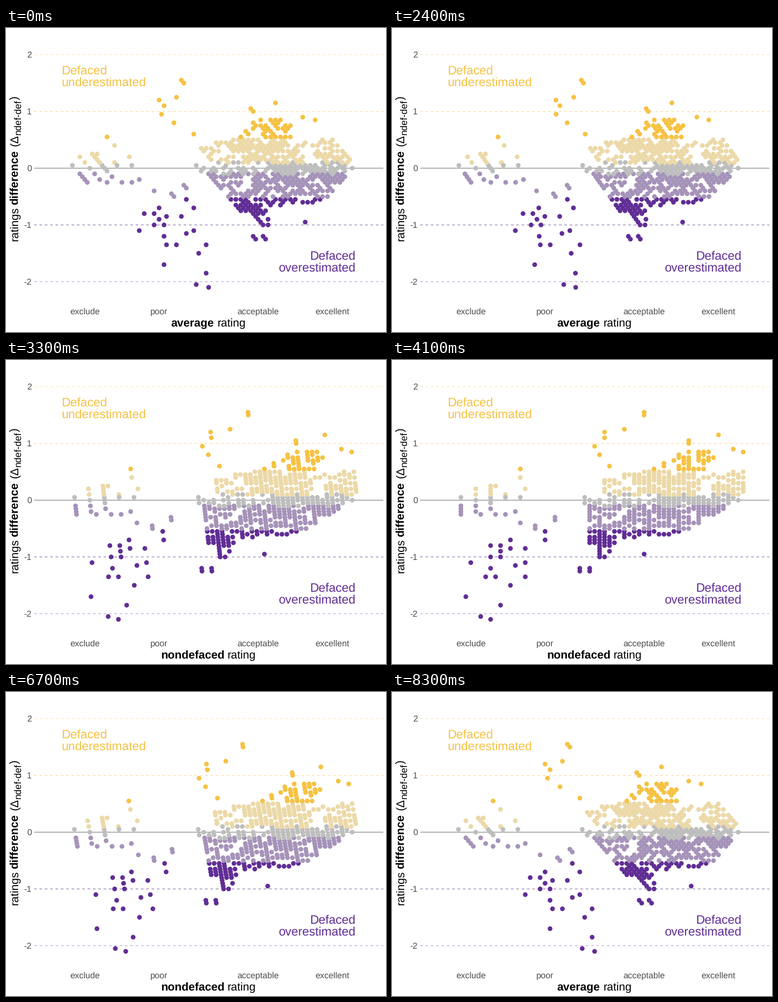
A matplotlib script that plays this animation: 837x669 px, repeating every 10 s.

```python
import numpy as np
import matplotlib.pyplot as plt
from matplotlib.animation import FuncAnimation

W, H, DPI = 837, 669, 64
PT = 72 / DPI
plt.rcParams.update({"font.family": "Liberation Sans", "text.hinting": "none",
                     "text.hinting_factor": 1})

GOLD, TAN, GREY = "#F6C244", "#ECD9A8", "#BEBEBE"
MAUVE, PURPLE = "#A693B9", "#612E95"
X0, Y0, DX, DY = 555.4, 308.5, 10.91, 6.245

# Ratings come in steps of 0.05: n counts the nondefaced rating from
# "acceptable", k counts the difference from zero.
RUNS = [  # n, first k, last k, step
    (0, 30, 31, 1), (-8, 22, 24, 2), (9, 20, 21, 1),
    (-37, -5, -2, 1), (-34, -4, 4, 2), (-31, -1, 5, 1),
    (-22, -10, -9, 1), (-18, -7, -6, 1), (-20, -14, -11, 3),
    (-29, -20, -16, 2), (-31, -24, -16, 4), (-24, -27, -17, 5),
    (-27, -17, -14, 3), (-13, -25, -24, 1), (-11, -25, -24, 1),
]
OUTLIERS = [
    (-4, 25), (15, 23), (-10, 19), (-9, 16), (-7, 12), (-25, 11), (18, 18),
    (20, 17), (-31, -42), (-33, -41), (-29, -37), (-36, -34), (-27, -30),
    (-30, -27), (-32, -27), (-26, -23), (-35, -22), (0, -19),
]


def density(n, k):
    """Chance that a dot sits at step n, k of the dense cloud."""
    if k > 10:
        inside = k - 9 >= 0 and n >= k - 9 and (n <= 12 or k > n)
        if not inside or k > 17 or n > 15:
            return 0
        return 0.62 if n >= 8 else 0.3
    if k < -10:
        floor = -13 - 8 * np.exp(-((n + 8.6) / 2.4) ** 2) + max(n - 1, 0) / 4
        if not (-11 <= n <= 8) or k < floor:
            return 0
        return 1 if n == -9 else 0.6
    if abs(k) < 2:
        if not -12 <= n <= 19:
            return 0
        return 0.85 if 3 <= n <= 13 else 0.5
    if k < 0:
        if not -11 <= n <= 19 + k:
            return 0
        return 0.85 if k >= -4 and n > 3 else 0.64
    if n < max(-8, 2 * k - 22) or n > 20:
        return 0
    if 11 <= n <= 16:
        return 0.6 if k < 7 else 0.12
    return 0.72 if n >= -2 else 0.5


def tint(k):
    if abs(k) < 2:
        return GREY
    if k > 0:
        return GOLD if k > 10 else TAN
    return PURPLE if k < -10 else MAUVE


def build_dots():
    rng = np.random.default_rng(12)
    dots = {}
    for k in range(-22, 18):
        for n in range(-12, 21):
            keep, mix = rng.random(2)
            if keep < density(n, k):
                dots[n, k] = GREY if abs(k) == 2 and mix < 0.35 else tint(k)
    # loose scatter around "exclude"
    for n, k in np.rint(rng.normal((-28, 0), (3.5, 4), (14, 2))).astype(int):
        dots[n, k] = tint(k)
    for n, first, last, step in RUNS:
        for k in range(first, last + 1, step):
            dots[n, k] = tint(k)
    for n, k in OUTLIERS:
        dots[n, k] = tint(k)
    return dots


dots = build_dots()
n, k = np.array(list(dots)).T
nondef_x = X0 + DX * n
mean_x = nondef_x - DX / 2 * k
dot_y = Y0 - DY * k

fig = plt.figure(figsize=(W / DPI, H / DPI), dpi=DPI, facecolor="white")
ax = fig.add_axes([0, 0, 1, 1])
ax.set_xlim(0, W)
ax.set_ylim(H, 0)
ax.axis("off")


def write(x, y, text, size, color="black", **kw):
    return ax.text(x, y, text, fontsize=size * PT, color=color,
                   va="baseline", **kw)


def rule(value, color, style=(0, (4.2, 4.2))):
    y = Y0 - 20 * DY * value
    ax.plot([62, 831], [y, y], color=color, lw=1.4 * PT, ls=style, snap=False,
            dash_capstyle="butt", solid_capstyle="butt", zorder=1)


rule(2, "#FBE6B4")
rule(1, "#F8DA98")
rule(0, "#7F7F7F", "-")
rule(-1, "#8C76AE")
rule(-2, "#BAA8D6")

for v in range(-2, 3):
    write(56.5, Y0 - 20 * DY * v + 6.5, str(v), 18.6, "#4D4D4D", ha="right")
for step, name in ((-35, "exclude"), (-20, "poor"),
                   (0, "acceptable"), (15, "excellent")):
    write(X0 + DX * step, 629.7, name, 18.6, "#4D4D4D", ha="center")

for line, (up, down) in enumerate((("Defaced", "Defaced"),
                                   ("underestimated", "overestimated"))):
    write(122.7, 101.7 + 25.8 * line, up, 26.6, GOLD)
    write(770, 510 + 25.8 * line, down, 26.6, PURPLE, ha="right")

for x, y, text, size, weight in (
        (26, 469, "ratings", 25, "normal"),
        (26, 387.5, "difference", 25, "bold"),
        (26, 260.5, "(Δ", 25, "normal"),
        (32.5, 235, "ndef-def", 20.8, "normal"),
        (26, 158, ")", 25, "normal")):
    write(x, y, text, size, weight=weight, rotation=90, rotation_mode="anchor")

axis_name = write(363.5, 657, "average", 25, weight="bold")
axis_word = write(465, 657, "rating", 25)

cloud = ax.scatter(mean_x, dot_y, s=(10.4 * PT) ** 2, c=list(dots.values()),
                   linewidths=0, zorder=3)


def ease(t):
    t = min(max(t, 0), 1)
    return 4 * t ** 3 if t < 0.5 else 1 - 4 * (1 - t) ** 3


def draw(i):
    go = (i - 14) / 28
    back = (i - 57) / 27
    p = ease(go) - ease(back)
    cloud.set_offsets(np.column_stack([mean_x + p * (nondef_x - mean_x), dot_y]))
    nondef = go >= 0.5 and back < 0.5
    axis_name.set_text("nondefaced" if nondef else "average")
    axis_name.set_x(341.5 if nondef else 363.5)
    axis_word.set_x(487.5 if nondef else 465)
    return cloud, axis_name, axis_word


anim = FuncAnimation(fig, draw, frames=100, interval=100, repeat=True,
                     repeat_delay=0, blit=False)
plt.show()
```
